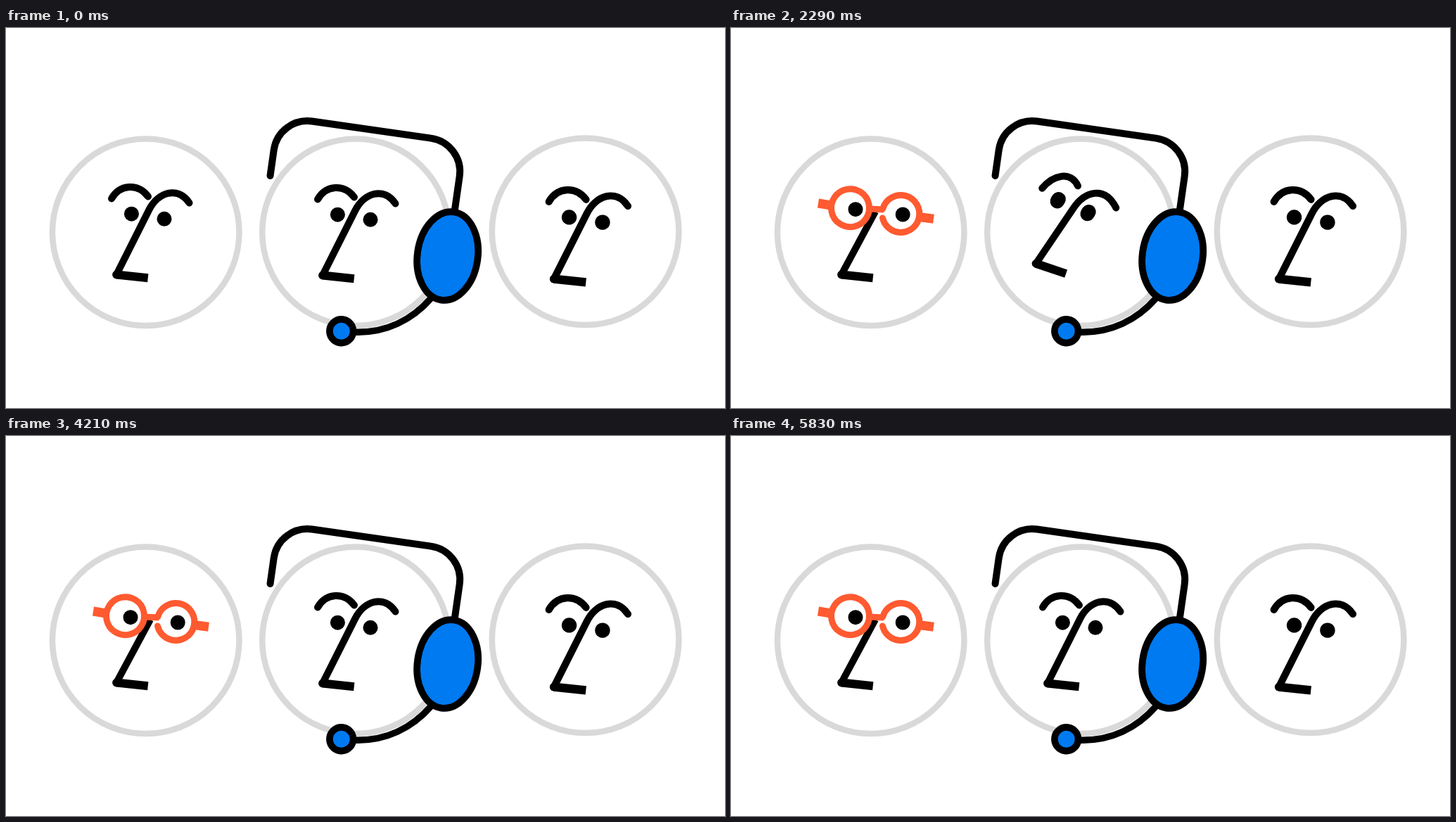
Recreate the animation shown at these times as an HTML page with a canvas. Size 1022 by 540 pixels, loop 5.88 s.

```html
<!DOCTYPE html>
<html lang="en">
<head>
<meta charset="utf-8">
<title>Three faces</title>
<style>
html, body { margin: 0; width: 100%; height: 100%; overflow: hidden; background: #fff; }
canvas { display: block; width: 1022px; height: 540px; }
</style>
</head>
<body>
<canvas id="stage" width="1022" height="540"></canvas>
<script>
const ctx = document.getElementById('stage').getContext('2d');
const LOOP = 5880;
const BLACK = '#000', GREY = '#d9d9d9', BLUE = '#007af0', ORANGE = [255, 90, 48];
const BROW_LIFT = 20, BASE_LENGTH = 45, EYE = 21;

const rad = deg => deg * Math.PI / 180;
const eye = (x, y, reach = [0, 0], bend = 0, size = EYE) => ({ at: [x, y], reach, bend, size });

// Key points of a face; all curves are derived from them.
const REST = {
  browFrom: [443, 243.5], browTo: [495, 240.5], lean: 0,
  tip: [450, 351.5], baseTurn: 6, bridge: [496, 260], flow: 0.28,
  archEnd: [553.5, 249.5], crest: 24.5,
  eyes: [eye(471.4, 265.2), eye(518, 272.3)]
};
const LOOK_UP = {
  browFrom: [448, 215], browTo: [498, 211.5], lean: 0.12,
  tip: [429, 321.5], baseTurn: 27, bridge: [487, 251], flow: 0.31,
  archEnd: [549.5, 257], crest: 37,
  eyes: [eye(466.6, 229, [1.6, -2.5], 0, 20), eye(507, 254, [1.6, -2.5], 0, 20)]
};
const WINK = {
  browFrom: [446.3, 253], browTo: [499.4, 259], lean: 0.04,
  tip: [444.3, 364.2], baseTurn: 6, bridge: [508.3, 263.3], flow: 0,
  archEnd: [560.4, 273.6], crest: -10,
  eyes: [eye(471.5, 278.8), eye(516.8, 292.6, [7, 2.2], 6, 9.5)]
};

// Blends numbers, lists and objects of the same form.
function mix(a, b, p) {
  if (typeof a === 'number') return a + (b - a) * p;
  if (Array.isArray(a)) return a.map((v, i) => mix(v, b[i], p));
  return Object.fromEntries(Object.keys(a).map(k => [k, mix(a[k], b[k], p)]));
}

function ease(t, from, to) {
  const x = Math.min(1, Math.max(0, (t - from) / (to - from)));
  return x * x * (3 - 2 * x);
}

function place(x, y, draw, scale = 1, turn = 0) {
  ctx.save();
  ctx.translate(x, y);
  ctx.rotate(rad(turn));
  ctx.scale(scale, scale);
  draw();
  ctx.restore();
}

function stroke(width, color, cap, draw) {
  ctx.lineWidth = width;
  ctx.strokeStyle = color;
  ctx.lineCap = cap;
  ctx.lineJoin = 'round';
  ctx.beginPath();
  draw();
  ctx.stroke();
}

function bar(width, color, from, to) {
  stroke(width, color, 'butt', () => { ctx.moveTo(...from); ctx.lineTo(...to); });
}

function ring({ at, r, from = 0, to = 360 }, width, color) {
  stroke(width, color, 'round', () => ctx.arc(...at, r, rad(from), rad(to)));
}

function drawEye({ at: [x, y], reach: [dx, dy], bend, size }) {
  stroke(size, BLACK, 'round', () => {
    ctx.moveTo(x - dx, y - dy);
    ctx.quadraticCurveTo(x, y - bend, x + dx + 0.02, y + dy);
  });
}

function drawBrow({ browFrom: [x0, y0], browTo: [x1, y1], lean }) {
  const dx = x1 - x0, dy = y1 - y0, length = Math.hypot(dx, dy);
  const control = (along, lift) => [
    x0 + dx * along + dy / length * lift,
    y0 + dy * along - dx / length * lift
  ];
  stroke(10, BLACK, 'round', () => {
    ctx.moveTo(x0, y0);
    ctx.bezierCurveTo(
      ...control(0.25 + lean, BROW_LIFT * (1 - 2 * lean)),
      ...control(0.75 + lean, BROW_LIFT * (1 + 2 * lean)),
      x1, y1);
  });
}

function drawNoseBase([x, y], turn) {
  place(x, y, () => {
    bar(12, BLACK, [0, 0], [BASE_LENGTH, 0]);
    ctx.fillStyle = BLACK;
    ctx.beginPath();
    ctx.arc(0, 0, 5.9, 0, rad(360));
    ctx.fill();
  }, 1, turn);
}

function drawFace(face) {
  const { tip, bridge, flow, archEnd: [x, y], crest } = face;
  drawBrow(face);
  stroke(10, BLACK, 'round', () => {
    ctx.moveTo(...tip);
    ctx.lineTo(...bridge);
    ctx.bezierCurveTo(...mix(tip, bridge, 1 + flow), x - 16.5, y - crest, x, y);
  });
  drawNoseBase(tip, face.baseTurn);
  face.eyes.forEach(drawEye);
}

// The brows curl round into lenses, then bridge and temples slide out.
const LENSES = [
  [{ at: [176, 257.5], r: 30.5, from: 213, to: 323 }, { at: [169.5, 255.7], r: 27, from: 213, to: 573 }],
  [{ at: [235, 264], r: 30, from: 215, to: 330 }, { at: [241.3, 264], r: 26.5, from: 195, to: 527 }]
];

function drawGlassesFace(t) {
  const p = ease(t, 200, 1050);
  if (p === 0) return place(-293, -1, () => drawFace(REST));
  const tint = ease(t, 450, 950), slide = ease(t, 850, 1270);
  const color = `rgb(${ORANGE.map(c => Math.round(c * tint))})`;
  const grow = (width, from, to) => bar(width, color, from, mix(from, to, slide));

  bar(10, BLACK, [157, 350.5], mix([208, 249], [205, 261], p));
  drawNoseBase([157, 350.5], REST.baseTurn);
  drawEye(mix(eye(178.4, 264.2), eye(177, 257.7), p));
  drawEye(mix(eye(225, 271.3), eye(244.2, 265), p));
  for (const [brow, lens] of LENSES) ring(mix(brow, lens, p), mix(10, 9, p), color);
  grow(9, [196, 257], [217, 258]);
  grow(13, [142, 252], [124, 249]);
  grow(13, [267, 268.5], [288, 271.2]);
}

// The head swings out to the left on its way up and back.
function drawThinkingFace(t) {
  const p = ease(t, 1880, 2600) - ease(t, 3560, 4160);
  const swing = Math.sin(Math.PI * p);
  place(-4 * swing, 1.5 * swing, () => drawFace(mix(REST, LOOK_UP, p)));
}

function drawWinkingFace(t) {
  const p = ease(t, 4420, 4900) - ease(t, 5380, 5800);
  place(321.6, -0.5, () => drawFace(mix(REST, WINK, p)), 1.016);
}

// Drawn upright, with the corner of the band at the origin.
function drawHeadset() {
  const width = 266.6, corner = 48;
  const pad = (x, y, rx, ry) => {
    ctx.fillStyle = BLUE;
    stroke(9.7, BLACK, 'round', () => {
      ctx.ellipse(x, y, rx, ry, 0, 0, rad(360));
      ctx.fill();
    });
  };
  stroke(10, BLACK, 'round', () => {
    ctx.moveTo(0, 85);
    ctx.arcTo(0, 0, corner, 0, corner);
    ctx.arcTo(width, 0, width, 95, corner);
    ctx.lineTo(width, 95);
  });
  stroke(9.5, BLACK, 'round', () => {
    ctx.moveTo(251, 225);
    ctx.bezierCurveTo(228, 260, 194, 283, 151, 288);
  });
  pad(265.7, 162.4, 43, 63.2);
  pad(131.3, 289.3, 16.8, 16.8);
}

function draw(t) {
  ctx.fillStyle = '#fff';
  ctx.fillRect(0, 0, 1022, 540);
  for (const at of [[198.7, 290.3], [497, 290.3], [823.6, 289.3]]) ring({ at, r: 132.8 }, 8.5, GREY);
  drawGlassesFace(t);
  drawThinkingFace(t);
  drawWinkingFace(t);
  place(387.5, 125.8, drawHeadset, 1, 8.1);
}

const start = performance.now();
function tick() {
  draw((performance.now() - start) % LOOP);
  requestAnimationFrame(tick);
}
tick();
</script>
</body>
</html>
```
